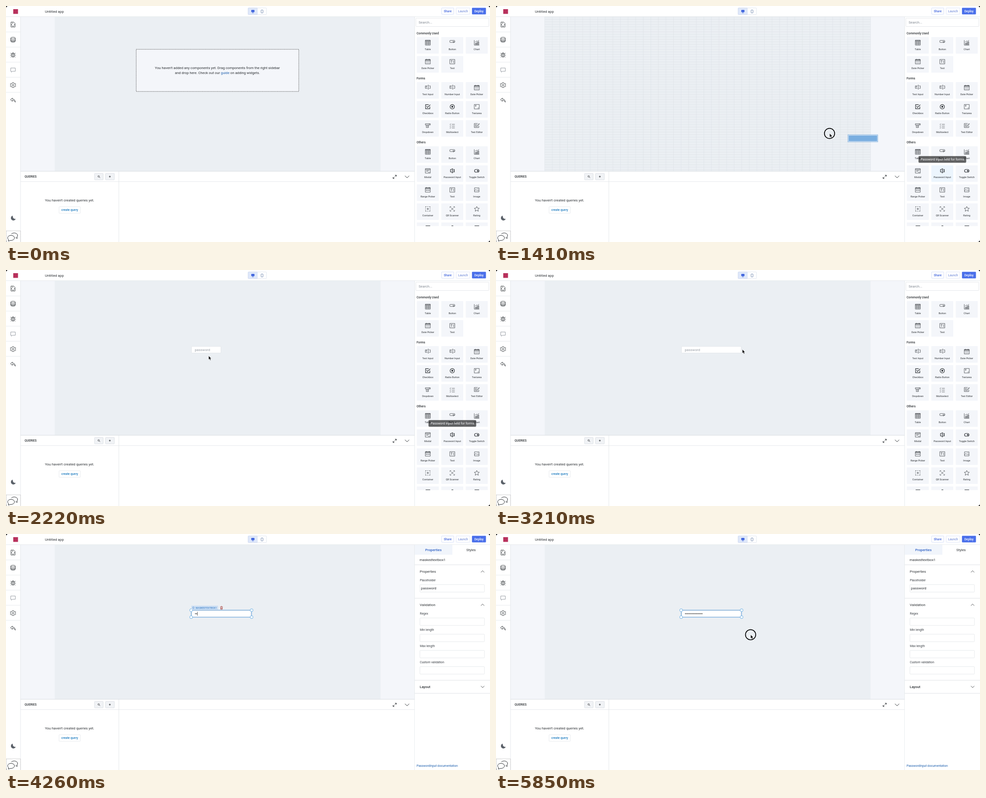
An HTML page for the animation above (5880 ms loop, 1068x524 px).

```html
<!DOCTYPE html>
<html lang="en">
<head>
<meta charset="utf-8">
<title>App builder</title>
<style>
  html, body { margin: 0; width: 100%; height: 100%; overflow: hidden; background: #000; }
  svg { display: block; width: 100vw; height: 100vh; font-family: Roboto, Arial, sans-serif; }
</style>
</head>
<body>
<svg id="stage" viewBox="0 0 1068 524"></svg>
<script>
const LOOP = 5880;
const COL = 719 / 43, ROW = 5.565, LEFT = 107.5, TOP = 24;
const INK = '#2b2f33', BLUE = '#3e63dd', LINE = '#dfe2e6';

// ---------- drawing helpers ----------
const text = (x, y, s, size = 7.78, fill = INK, weight = 400, anchor = 'start') =>
  `<text x="${x}" y="${y}" font-size="${size}" fill="${fill}" font-weight="${weight}" text-anchor="${anchor}">${s}</text>`;
const rect = (x, y, w, h, fill, stroke = 'none', r = 0, sw = .6, more = '') =>
  `<rect x="${x}" y="${y}" width="${w}" height="${h}" fill="${fill}" stroke="${stroke}" stroke-width="${sw}" rx="${r}" ${more}/>`;
const path = (d, stroke = INK, sw = .8, fill = 'none', more = '') =>
  `<path d="${d}" stroke="${stroke}" stroke-width="${sw}" fill="${fill}" ${more}/>`;
const circle = (x, y, r, fill, stroke = 'none', sw = 1) =>
  `<circle cx="${x}" cy="${y}" r="${r}" fill="${fill}" stroke="${stroke}" stroke-width="${sw}"/>`;
const at = (x, y, body) => `<g transform="translate(${x} ${y})">${body}</g>`;
const layer = (id, body = '') => `<g id="${id}">${body}</g>`;

// ---------- component tiles, icons centred on 0,0 ----------
const BOX = 'M-5.5-5h11v10h-11z', DOT = 'M-.6 0h1.2';
const ICONS = {
  'Table': 'M-5.5-5.5h11v11h-11zM-5.5-3h11M-5.5-.2h11M-5.5 2.6h11M-2-3v8.5M2-3v8.5M-5.5-4.4h11',
  'Button': 'M2-.5h-6.5q-1 0-1-1v-2.5q0-1 1-1h9q1 0 1 1v2.5q0 1-1 1M1.5-3l3.5 1.4-1.7.6-.6 1.6z',
  'Chart': 'M-5.5-5.5v11h11M-3 5v-4h1.5v4M0 5v-5.5h1.5v5.5M3 5v-7h1.5v7M-3.5-1.5l3-2 2 .8 3.5-2.6',
  'Date Picker': BOX + 'M-5.5-2.2h11M-5.5-4h11M-3-6v2M3-6v2M-3.5 0h1.5M-.8 0h1.5M2 0h1.5M-3.5 2.5h1.5M-.8 2.5h1.5M2 2.5h1.5',
  'Text': BOX + 'M-3.5-2.5h4M-1.5-2.5v5.5M3-3v6.2',
  'Text Input': 'M-1-3.5h-4.5v5.5h4.5M3-3.5h2.5v5.5h-2.5M1-5v8.5M0-5h2M0 3.5h2M-4-2h2M-3-2v2.6',
  'Number Input': 'M-1-3.5h-4.5v5.5h4.5M3-3.5h2.5v5.5h-2.5M1-5v8.5M0-5h2M0 3.5h2M-3.8-1.6l1-.6v3',
  'Checkbox': 'M4.5-.5v5h-9.5v-9h7M-3-1l2.5 2.6 6-6.2',
  'Radio Button': 'M-4.8 0a4.8 4.8 0 1 0 9.6 0a4.8 4.8 0 1 0-9.6 0M-1.5 0a1.5 1.5 0 1 0 3 0a1.5 1.5 0 1 0-3 0M-1 0h2',
  'Textarea': BOX + 'M-3.8-3h3M-2.3-3v3.5M2 3.5l2-2M3.4 3.7l.6-.6',
  'Dropdown': 'M-5.5-4.5h11v2.8h-11zM-3.5-1.5v5.5h5v-5.5M-2 0h2.5M-2 2h2.5M2.5-3.4h1.5',
  'Multiselect': 'M-5.5-3.5l1 1 1.5-2M-5.5.5l1 1 1.5-2M-5.5 4.5l1 1 1.5-2M-1-3.2h6.5M-1 .8h6.5M-1 4.8h6.5',
  'Text Editor': 'M2-4.5h-7.5v9h10v-4M-4-2h4M-4 0h4M-4 2.3h6.5M1 0l4-4.5 1 1-4 4z',
  'Modal': BOX + 'M-5.5-3.2h11M-3.5-1h7M-3.5 1h4M1 3.2h3',
  'Password Input': 'M-1.5-3h-2.5v5.5h2.5M1.5-3h3v5.5h-3M0-4.5v8.5M-1.4-4.8q1.4 0 1.4 1q0-1 1.4-1M-1.4 4.3q1.4 0 1.4-1q0 1 1.4 1M1.8-.2h1.6',
  'Toggle Switch': 'M-2-3h4a3 3 0 0 1 0 6h-4a3 3 0 0 1 0-6M1 0a1 1 0 1 0 2 0a1 1 0 1 0-2 0M1.5 0h1',
  'Range Picker': BOX + 'M-5.5-2.2h11M-5.5-4h11M-3-6v2M3-6v2M-3.5 1h7M-3.5 0v2M3.5 0v2',
  'Image': 'M-5-4.5h10v9h-10zM-5 2.5l3-3.5 3 3 1.8-1.6 2.2 2M1.5-2.2h1.5',
  'Container': 'M-5-5h2M-1-5h2M3-5h2v2M5-1v2M5 3v2h-2M1 5h-2M-3 5h-2v-2M-5 1v-2M-5-3v-2M0-2.5v5M-2.5 0h5',
  'QR Scanner': 'M-5-2.5v-2.5h2.5M2.5-5h2.5v2.5M5 2.5v2.5h-2.5M-2.5 5h-2.5v-2.5M-3-3l6 6M3-3l-6 6',
  'Rating': 'M0-5.5l1.6 3.7 4 .4-3 2.7.9 3.9-3.5-2.1-3.5 2.1.9-3.9-3-2.7 4-.4z',
};
const HEAVY = ['Password Input', 'Toggle Switch', 'Checkbox', 'Radio Button'];

function tile(name, col, y) {
  const x = 906.5 + col * 54;
  const lift = name.startsWith('Text ') || name === 'Number Input' ? -.5 : 0;
  return rect(x, y, 48.5, 36.8, '#f4f6fa', 'none', 1, 0, name === 'Password Input' ? 'id="source"' : '') +
    at(x + 24.3, y + 12.4 + lift, path(ICONS[name], '#22262a', HEAVY.includes(name) ? 1.1 : .7)) +
    text(x + 24.3, y + 28.7, name, 5.56, INK, 400, 'middle');
}
const section = (title, titleY, y, names) => text(906, titleY, title, 6.67, INK, 500) +
  names.map((n, i) => tile(n, i % 3, y + Math.floor(i / 3) * 42.25)).join('');

function componentsPanel() {
  const peek = [0, 1, 2].map(i => rect(906.5 + i * 54, 480.6, 48.5, 8, '#f4f6fa')).join('');
  return rect(904.5, 27, 161, 18.5, '#fff', '#d3d7dc', 1) + text(910.5, 39, 'Search...', 7.78, '#818891') +
    section('Commonly Used', 63, 69, ['Table', 'Button', 'Chart', 'Date Picker', 'Text']) +
    section('Forms', 163, 169, ['Text Input', 'Number Input', 'Date Picker', 'Checkbox', 'Radio Button',
      'Textarea', 'Dropdown', 'Multiselect', 'Text Editor']) +
    section('Others', 305.3, 311.4, ['Table', 'Button', 'Chart', 'Modal', 'Password Input', 'Toggle Switch',
      'Range Picker', 'Text', 'Image', 'Container', 'QR Scanner', 'Rating']) +
    peek + path('M926 488h10M983 488h4M1034 488h10', INK, 1.2);
}

function propertiesPanel() {
  const field = (label, y) => text(913.3, y, label, 6.67, '#3a3f45') + rect(913.3, y + 7.8, 142.5, 16.7, '#fff', '#d6dade', 1.5);
  const rule = y => path(`M902 ${y}h166`, LINE, 1);
  const heading = (s, y, w) => text(913, y, s, 7.78, INK, w);
  const chevron = (y, dir) => path(`M1048 ${y + dir * 2}l3.7 ${-dir * 4} 3.7 ${dir * 4}`, INK, .8);
  return rect(902, 24, 166, 500, '#fff') + rect(902, 24, 83, 22, '#f1f5fb') +
    text(943.2, 38, 'Properties', 7.78, '#2c5fc4', 500, 'middle') + text(1026.2, 38, 'Styles', 7.78, INK, 400, 'middle') +
    text(912.5, 59.7, 'maskedtextbox1') + rule(68.4) +
    heading('Properties', 86, 400) + chevron(83.3, 1) + field('Placeholder', 104.5) + text(915.8, 123.2, 'password') + rule(142.7) +
    heading('Validation', 159.8, 400) + chevron(157.3, 1) +
    ['Regex', 'Min length', 'Max length', 'Custom validation'].map((s, i) => field(s, 178.6 + i * 36)).join('') + rule(324.8) +
    heading('Layout', 341.8, 500) + chevron(339.3, -1) + rule(353.8) +
    text(906, 517, 'PasswordInput documentation', 6.67, '#1d5fae');
}

function shell() {
  const button = (x, w, s, fill, border, color) => rect(x, 4.3, w, 14, fill, border, 1) + text(x + w / 2, 13.7, s, 6.67, color, 500, 'middle');
  const rail = [
    'M-4.5-5.5h6l3 3v8h-9zM-2.5-1l-1 1.5 1 1.5M2.5-1l1 1.5-1 1.5M-2 3.5h4M-2.5-3.2h3',
    'M-5-3.5a5 2 0 0 1 10 0v7a5 2 0 0 1-10 0zM-5-3.5a5 2 0 0 0 10 0M-5-.2a5 2 0 0 0 10 0M-5 2a5 2 0 0 0 10 0',
    'M-2.8-2.5h5.6v4.5a2.8 3.2 0 0 1-5.6 0zM-2-2.5a2 2.3 0 0 1 4 0M0-2v7M-5.5-4l2.7 2.5M5.5-4l-2.7 2.5M-6 .8h3M6 .8h-3M-5 5.2l2.5-2M5 5.2l-2.5-2',
    'M-5-4.3h10v7.3h-6.5l-2.2 2v-2h-1.300z',
    'M-1.200-5.500h2.400l.5 1.500 1.500.7 1.500-.5 1.200 2-1.100 1.100v1.400l1.100 1.100-1.200 2-1.500-.5-1.500.7-.5 1.500h-2.400l-.5-1.500-1.500-.7-1.500.5-1.200-2 1.100-1.100v-1.400l-1.100-1.100 1.200-2 1.500.5 1.500-.7zM-1.700 0a1.700 1.700 0 1 0 3.400 0a1.700 1.700 0 1 0-3.400 0',
    'M-1.500-5l-4 3.800 4 3.800v-2.300q4.500-.5 6.500 4.200q.2-6.700-6.500-7.200z',
  ];
  const railIcons = rail.map((d, i) => at(15.5, 41.2 + i * 33.6, path(d, i === 3 ? '#8b9198' : INK, .9)) +
    (i < 5 ? path(`M0 ${57.7 + i * 33.5}h32`, LINE, .7) : '')).join('');
  return rect(0, 0, 1068, 524, '#fff', 'none', 5) +
    rect(32, 24, 870, 343, '#f4f6fa') + rect(LEFT, TOP, 719, 343, '#ebeff3') +
    path('M0 23.700h1068M32 24v500M901.700 24v500M32 389.800h869.700M249 367v157', LINE, .8) + path('M32 367h869.700', '#d5dade', .9) +
    rect(16, 7, 10.5, 10.5, '#b8315c') + text(86, 14.5, 'Untitled app') +
    rect(534.3, 4.3, 40.500, 14.700, '#fff', '#cdd5e3', 1.500) + rect(534.3, 4.3, 20.300, 14.700, '#dfe8fa', '#c3cfe8', 1) +
    rect(541.5, 9, 6.500, 4.300, BLUE, BLUE, .5) + path('M544.700 13.500v1.500M542.700 15.300h4', BLUE, .8) +
    rect(562.9, 8.8, 4.200, 6.500, 'none', '#55709f', .7, .8) +
    button(961.300, 26.700, 'Share', '#fff', '#b9c8f3', BLUE) + button(993.300, 30.500, 'Launch', '#fff', '#ccd6f3', '#8298dd') +
    button(1028.500, 30.300, 'Deploy', '#4a6fea', '#4a6fea', '#fff') + railIcons +
    path('M14.500 465.500a5.500 5.500 0 1 0 7 7q-6 1.500-7-7z', 'none', 0, '#5b6169') +
    rect(.5, 499.300, 31.500, 27, '#fff', '#777', 0, .6, 'stroke-dasharray="1 .7"') +
    path('M12 506a7.500 5.500 0 1 1 12 7l1 3-4-1.500', INK, 1) +
    path('M6 519a7.500 5.700 0 1 1 4 1.500l-5 1.500z', INK, 1, '#fff') +
    text(41, 381, 'QUERIES', 6.67, INK, 500) +
    rect(195.400, 371.700, 19, 14.300, '#f1f3f6', '#ccd1d7', 1) + rect(219.600, 371.700, 19.500, 14.300, '#f1f3f6', '#ccd1d7', 1) +
    circle(204.400, 378.300, 1.700, 'none', INK, .8) + path('M205.600 379.500l2 2M227 378.800h4.200M229.100 376.700v4.200', INK, .9) +
    path('M858.300 375.700h3v3M861.300 375.700l-3.200 3.200M857 383h-3v-3M854 383l3.200-3.200', INK, 1) +
    path('M880.300 377l4.700 4.500 4.700-4.500', INK, 1) +
    text(140.300, 434, 'You haven\'t created queries yet.', 7.78, INK, 400, 'middle') +
    rect(117, 445.700, 47, 14.500, '#fff', '#d9dde2', 1) + text(140.500, 455.300, 'create query', 6.67, '#1d7cc0', 500, 'middle');
}

function emptyHint() {
  return rect(287.300, 96.200, 358.700, 93.600, '#f4f6fa', '#333', 0, .8, 'stroke-dasharray="2 1.300"') +
    text(466.500, 140.200, 'You haven\'t added any components yet. Drag components from the right sidebar', 7.78, INK, 400, 'middle') +
    text(466.500, 151.300, 'and drop here. Check out our <tspan fill="#1d5fae">guide</tspan> on adding widgets.', 7.78, INK, 400, 'middle');
}

function gridLines() {
  let d = '';
  for (let c = 0; c <= 43; c++) d += `M${LEFT + c * COL} ${TOP}V366.600`;
  for (let r = 0; r <= 61; r++) d += `M${LEFT} ${TOP + r * ROW}h719`;
  return path(d, '#dce1e6', .6);
}

const tag = rect(409, 159, 59, 9, '#cfe0f4', 'none', 1) + rect(412, 162, 3, 3.500, 'none', '#4285cc', .5, .7) +
  text(418.500, 165.500, 'MASKEDTEXTBOX1', 5.25, '#4285cc', 500) +
  path('M472.700 161.500h5.600M474.500 160.500h2M473.300 162.500l.4 4.700h3.600l.4-4.700M474.800 163v3.500M476.200 163v3.500', '#a8413c', .8);

const stage = document.getElementById('stage');
stage.innerHTML = shell() + layer('grid', gridLines()) + layer('hint', emptyHint()) + layer('widget') + layer('tag', tag) +
  layer('components', componentsPanel()) + layer('properties', propertiesPanel()) + layer('preview') +
  layer('tooltip', rect(932.300, 333.300, 105.200, 14.800, '#000', 'none', 2) +
    text(985, 343.200, 'Password input field for forms', 7.16, '#fff', 400, 'middle')) +
  layer('pointer', `<g id="ring">${circle(0, 0, 11.300, 'none', '#000', 1.700)}</g>` +
    `<g id="arrow">${path('M.2 0v8.300l1.900-1.700 1.400 3.100 1.500-.7-1.400-2.900h2.500z', '#fff', .5, '#000')}</g>` +
    `<g id="beam">${path('M-2-5.500q2 0 2 1.500q0-1.500 2-1.500M0-4v8M-2 5.500q2 0 2-1.500q0 1.500 2 1.500', '#111', .9)}</g>`);
const el = Object.fromEntries([...stage.querySelectorAll('[id]')].map(e => [e.id, e]));

// ---------- motion ----------
const MOVES = [
  [30, 565, 0], [600, 955, 334], [960, 983.500, 367.500], [1170, 983.500, 367.500], [1410, 736, 283], [1650, 517, 216.500],
  [1800, 447, 190.700], [2240, 447, 190.700], [2550, 476, 176.500], [2760, 476, 176.500], [2970, 543.500, 176.500],
  [3220, 543.500, 176.500], [3690, 450.500, 178], [5240, 450.500, 178], [5700, 561.800, 223.700], [LOOP, 561.800, 223.700],
];

// Monotone cubic through the key points: no overshoot, and holds stay still.
function pointerAt(t) {
  const i = Math.max(0, MOVES.findLastIndex(m => m[0] <= t));
  if (i === MOVES.length - 1) return MOVES[i].slice(1);
  const slope = (k, axis) => (MOVES[k + 1][axis] - MOVES[k][axis]) / (MOVES[k + 1][0] - MOVES[k][0]);
  const tangent = (k, axis) => {
    if (k === 0) return slope(0, axis);
    if (k === MOVES.length - 1) return 0;
    const a = slope(k - 1, axis), b = slope(k, axis);
    return a * b <= 0 ? 0 : 2 * a * b / (a + b);
  };
  const span = MOVES[i + 1][0] - MOVES[i][0], u = Math.max(0, (t - MOVES[i][0]) / span), v = 1 - u;
  return [1, 2].map(axis => MOVES[i][axis] * v * v * (1 + 2 * u) + MOVES[i + 1][axis] * u * u * (3 - 2 * u) +
    span * (tangent(i, axis) * u * v * v - tangent(i + 1, axis) * u * u * v));
}

const within = (t, from, to) => t >= from && t < to;
const clamp = v => Math.min(1, Math.max(0, v));
const show = (e, on) => e.style.display = on ? '' : 'none';

function previewBox(t) {
  const [x, y] = pointerAt(1340 + 90 * Math.floor((t - 1340) / 90));
  const col = Math.round((x - 38 - LEFT) / COL), row = Math.max(26, Math.floor((y - 25 - TOP) / ROW));
  const px = LEFT + col * COL + .3, py = TOP + row * ROW + .3;
  return rect(px, py, 66, 16, '#d9e7f5', '#6ba3d8', 0, .7) + rect(px + 1.500, py + 1.700, 63, 12.600, '#7aaee0');
}

function widgetBox(t, x, framed, selected) {
  const cols = t < 2760 ? 4 : Math.min(8, Math.max(4, Math.round((x - 409) / COL)));
  const w = (t > 2970 ? 8 : cols) * COL - 2;
  let s = rect(409.300, 169.700, w, 14.600, '#fff', selected ? '#a9b4c2' : '#d6dadf', .8, selected ? 1 : .6);
  const dots = selected ? Math.min(15, Math.floor((t - 4180) / 70) + 1) : 0;
  if (dots < 1) s += text(416.500, 179.800, 'password', 7.78, '#979da5');
  for (let i = 0; i < dots; i++) s += circle(418 + i * 2.620, 177, .9, '#222');
  if (selected && t < 5820) s += path(`M${417 + Math.max(0, dots) * 2.620} 172.700v8.600`, '#111', .7);
  if (framed) {
    s += rect(408.600, 169, w + 1.600, 15.800, 'none', '#6aaae6', 0, 1);
    for (const hx of [408.600, 410.200 + w]) for (const hy of [169.200, 184.600]) s += circle(hx, hy, 3.200, '#fff', '#5aa5e0', .9);
  }
  return s;
}

function draw(now) {
  const t = Math.floor(now % LOOP / 30) * 30;
  const [x, y] = pointerAt(t);
  const placed = t >= 2070, selected = t >= 4110, resizing = within(t, 2760, 3120);
  const hovered = placed && x < 542 && y > 168 && y < 187;
  const beam = t >= 3120 && hovered && x < 536;

  show(el.hint, t < 1200);
  show(el.grid, within(t, 1200, 2070) || resizing);
  show(el.preview, within(t, 1340, 2070));
  if (within(t, 1340, 2070)) el.preview.innerHTML = previewBox(t);
  el.source.setAttribute('fill', within(t, 1200, 2070) ? '#ecf5fd' : '#f4f6fa');
  el.tooltip.style.opacity = t < 2100 ? clamp((t - 1320) / 150) : clamp((2310 - t) / 150);

  show(el.widget, placed);
  if (placed) el.widget.innerHTML = widgetBox(t, x, hovered || resizing || selected, selected);
  show(el.tag, hovered || resizing);
  show(el.components, !selected);
  show(el.properties, selected);

  show(el.pointer, t >= 30 && !within(t, 4170, 5250));
  el.pointer.setAttribute('transform', `translate(${x} ${y})`);
  show(el.arrow, !beam);
  show(el.beam, beam);
  show(el.ring, within(t, 1020, 2070) || within(t, 2550, 3120) || within(t, 4050, 4140) || t >= 5730);
}

(function tick() {
  draw(performance.now());
  requestAnimationFrame(tick);
})();
</script>
</body>
</html>
```
